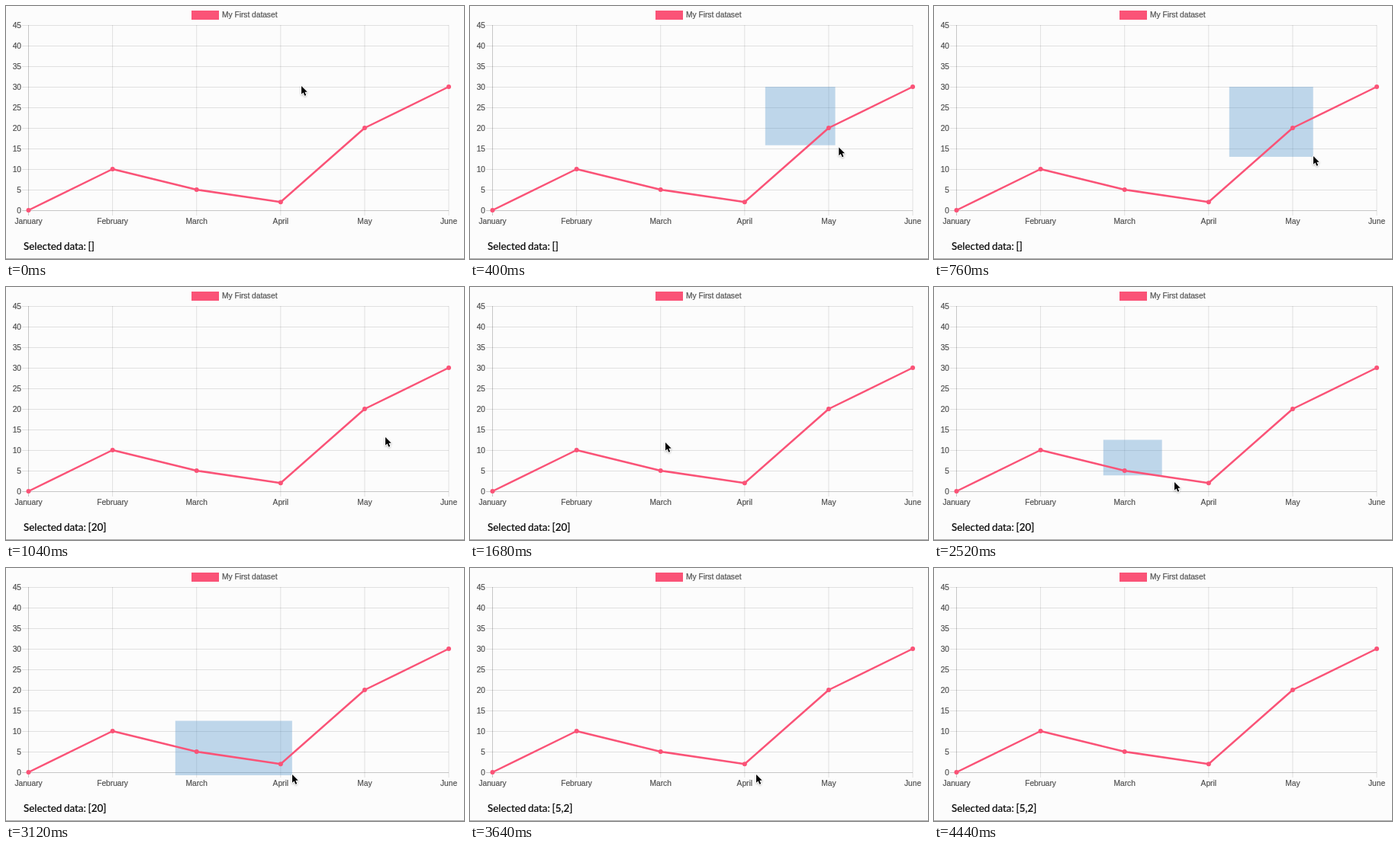
Recreate the animation shown at these times as an HTML page. Size 600x332 px, loop 4.88 s.

```html
<!DOCTYPE html>
<html lang="en">
<head>
<meta charset="utf-8">
<title>Drag to select chart data</title>
<style>
  html, body { margin: 0; width: 100%; height: 100%; overflow: hidden; background: #fcfcfc; }
  svg { display: block; width: 600px; height: 332px; }
  text { font: 10.2px "Liberation Sans", Arial, sans-serif; fill: #505050; stroke: #505050; stroke-width: .2; }
  .mid { text-anchor: middle; }
  .end { text-anchor: end; }
  #result { font: 13.4px Lato, "Open Sans", sans-serif; word-spacing: -.7px; fill: #000; stroke: #000; }
  #grid path { stroke: #000; stroke-opacity: .11; }
  #grid .axis { stroke-opacity: .21; }
  #box { fill: rgb(72, 141, 200); fill-opacity: .34; }
  #series { fill: none; stroke: #fa5377; stroke-width: 2.5; stroke-linejoin: round; }
  #dots, #key { fill: #fa5377; }
  #cursor { filter: drop-shadow(0 1px 1px rgba(0, 0, 0, .25)); }
  #cursor path { stroke: #fff; stroke-width: 1.8; paint-order: stroke; stroke-linejoin: round; }
</style>
</head>
<body>
<svg viewBox="0 0 600 332">
  <rect width="600" height="332" fill="#fcfcfc"/>
  <g id="grid"></g>
  <rect id="key" x="243" y="6" width="36" height="12"/>
  <text x="283" y="15.3">My First dataset</text>
  <g id="labels"></g>
  <rect id="box"/>
  <path id="series"/>
  <g id="dots"></g>
  <text id="result" x="23" y="320"></text>
  <path d="M0 331.5H600" stroke="#a9a9a9"/>
  <g id="cursor"><path transform="scale(.92)" d="M0 0V11.8L2.7 9.3L4.7 13.9L6.7 13L4.8 8.5H8.4Z"/></g>
</svg>
<script>
const LOOP = 4880, STEP = 40, HIDE = 4440;
const $ = id => document.getElementById(id);
const months = ['January', 'February', 'March', 'April', 'May', 'June'];
const values = [0, 10, 5, 2, 20, 30];
const px = i => 29.5 + 110.1 * i;
const py = v => 268 - 5.4 * v;

function set(el, attrs) {
  for (const k in attrs) el.setAttribute(k, attrs[k]);
}

function add(parent, tag, attrs, text = '') {
  const el = document.createElementNS('http://www.w3.org/2000/svg', tag);
  set(el, attrs);
  el.textContent = text;
  $(parent).append(el);
}

for (let v = 0; v <= 45; v += 5) {
  const y = Math.round(py(v)) + .5;
  add('grid', 'path', { d: `M21 ${y}H580`, class: v ? '' : 'axis' });
  add('labels', 'text', { x: 20, y: y + 3.2, class: 'end' }, v);
}
months.forEach((name, i) => {
  add('grid', 'path', { d: `M${px(i)} 25V275`, class: i ? '' : 'axis' });
  add('labels', 'text', { x: px(i), y: 286.3, class: 'mid' }, name);
  add('dots', 'circle', { cx: px(i), cy: py(values[i]), r: 3 });
});
$('series').setAttribute('d', 'M' + values.map((v, i) => `${px(i)} ${py(v)}`).join('L'));

const linear = u => u;
const easeIn = u => u * u;
const easeOut = u => 1 - (1 - u) ** 2;
const easeOutCubic = u => 1 - (1 - u) ** 3;
const easeInOut = u => u * u * (3 - 2 * u);

// Pointer moves; it rests between them
const home = [387, 105];
const moves = [
  { from: 0, to: 800, at: [497, 197], ease: easeOutCubic },
  { from: 1120, to: 1680, at: [256, 204], ease: easeInOut },
  { from: 1680, to: 2000, at: [222, 199.5], ease: easeOut },
  { from: 2080, to: 2520, at: [315, 256], ease: easeIn },
  { from: 2520, to: 2840, at: [375, 271], ease: easeOut },
  { from: 3640, to: 4200, at: [382, 274], ease: linear },
  { from: 4320, to: 4400, at: [388, 288], ease: easeIn }
];
const drags = [{ from: 40, to: 840 }, { from: 2120, to: 3600 }];

function pointer(t) {
  let pos = home;
  for (const m of moves) {
    if (t <= m.from) break;
    const k = m.ease(Math.min(1, (t - m.from) / (m.to - m.from)));
    pos = pos.map((p, i) => p + (m.at[i] - p) * k);
  }
  return pos;
}

function draw(now) {
  const t = Math.floor(now % LOOP / STEP) * STEP;
  $('cursor').setAttribute('transform', `translate(${pointer(t)})`);
  $('cursor').style.display = t < HIDE ? '' : 'none';

  // The selection trails the pointer by one step
  const drag = drags.find(d => t >= d.from && t < d.to);
  $('box').style.display = drag ? '' : 'none';
  if (drag) {
    const [x0, y0] = pointer(drag.from - STEP);
    const [x1, y1] = pointer(t - STEP);
    set($('box'), { x: x0 - .2, y: y0 + 1, width: x1 - x0, height: y1 - y0 });
  }

  const picked = t < drags[0].to ? '[]' : t < drags[1].to ? '[20]' : '[5,2]';
  $('result').textContent = 'Selected data: ' + picked;
}

const start = performance.now();
function tick() {
  draw(performance.now() - start);
  requestAnimationFrame(tick);
}
tick();
</script>
</body>
</html>
```
